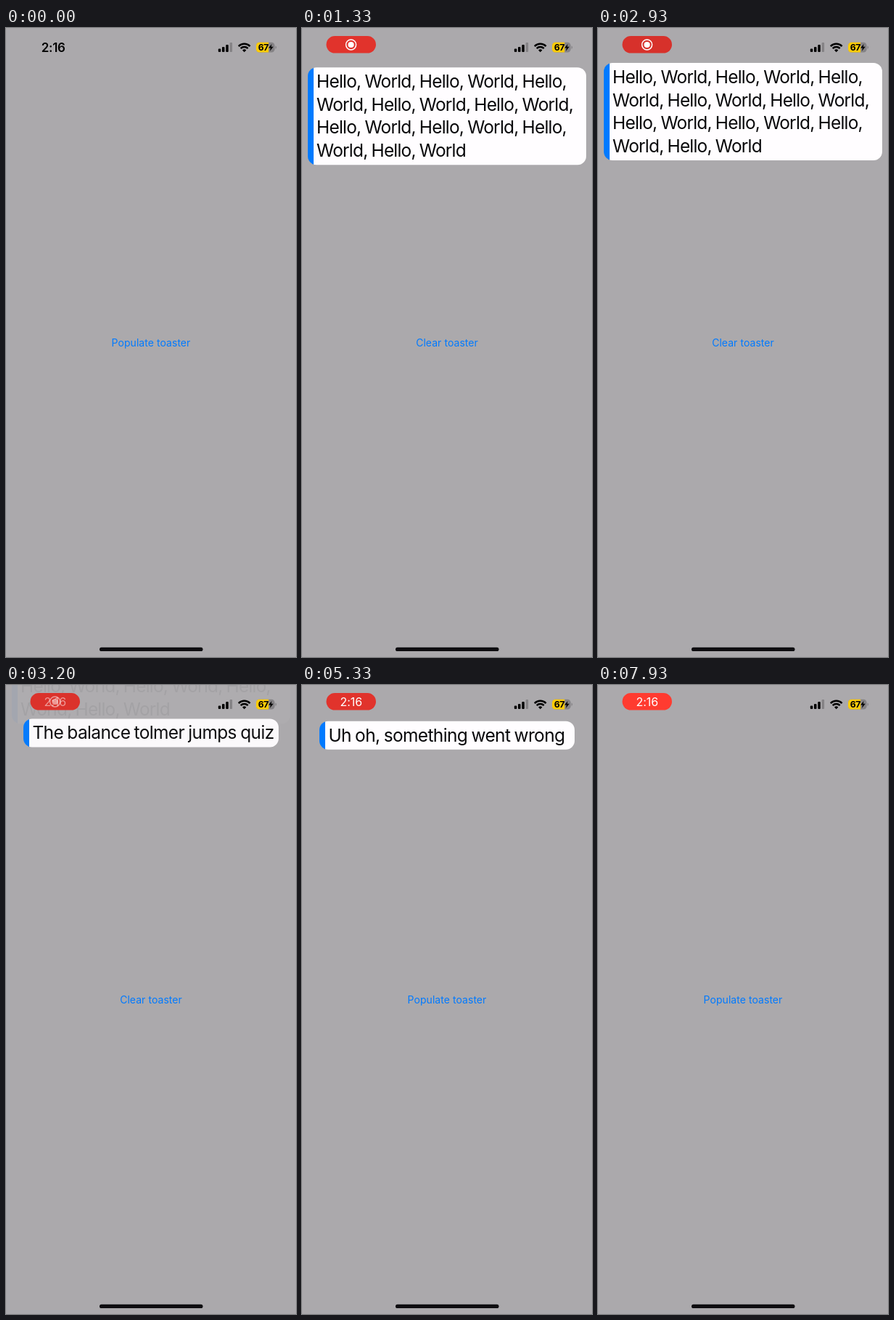
An HTML page for the animation above (8 s loop, 400x865 px).

```html
<!DOCTYPE html>
<html lang="en">
<head>
<meta charset="utf-8">
<title>Toaster</title>
<style>
  html, body { margin: 0; width: 100%; height: 100%; overflow: hidden; background: #aba9ac; }
  #stage {
    position: relative; width: 400px; height: 865px; overflow: hidden;
    background: #aba9ac; font-family: Inter, sans-serif; font-optical-sizing: none;
  }
  .toast {
    position: absolute; top: 48.2px; box-sizing: border-box;
    padding: 3.6px 0 3.5px 12.1px; border-radius: 12px; overflow: hidden;
    background: linear-gradient(90deg, #007aff 8.2px, #fffdff 8.2px);
    color: #08080a; font-size: 24.5px; line-height: 31.8px;
    letter-spacing: -.64px; word-spacing: -1px; white-space: pre; opacity: 0;
  }
  .wide { left: 8px; width: 384px; letter-spacing: -.81px; }
  .slim { left: 24.3px; width: 352.2px; }
  .label {
    position: absolute; left: 0; width: 400px; top: 423px; text-align: center;
    font-size: 14px; line-height: 20px; letter-spacing: .05px; color: #007aff;
  }
  #status { position: absolute; inset: 0; }
</style>
</head>
<body>
<div id="stage">
  <div class="label" id="populate">Populate toaster</div>
  <div class="label" id="clear">Clear toaster</div>

  <div class="toast wide">Hello, World, Hello, World, Hello,
World, Hello, World, Hello, World,
Hello, World, Hello, World, Hello,
World, Hello, World</div>
  <div class="toast slim">The balance tolmer jumps quiz</div>
  <div class="toast slim">Uh oh, something went wrong</div>

  <svg id="status" width="400" height="865" viewBox="0 0 400 865" text-anchor="middle">
    <text id="clock" x="65.2" y="33" font-size="17" font-weight="600" letter-spacing="-.3">2:16</text>

    <g id="pill">
      <rect id="pillFill" x="33.5" y="11" width="68.5" height="23.6" rx="11.8" fill="#ff3b30"/>
      <g id="record" fill="#fff">
        <circle cx="67.6" cy="23" r="7" fill="none" stroke="#fff" stroke-width="1.5"/>
        <circle cx="67.6" cy="23" r="4.1"/>
      </g>
      <text id="pillTime" x="67.8" y="28.7" font-size="16" letter-spacing="-.1" fill="#fff">2:16</text>
    </g>

    <!-- signal -->
    <rect x="292.8" y="28.4" width="3.5" height="4.6" rx="1"/>
    <rect x="298" y="26" width="3.5" height="7" rx="1"/>
    <rect x="303.3" y="23" width="3.5" height="10" rx="1"/>
    <rect x="308.6" y="20" width="3.5" height="13" rx="1" fill="#858386"/>

    <!-- wifi -->
    <g fill="none" stroke="#000" stroke-width="2.5">
      <path d="M320.8 25.1a11.2 11.2 0 0 1 15.8 0"/>
      <path d="M323.7 28.2a7 7 0 0 1 10 0"/>
    </g>
    <path d="M328.7 33.3l-2.7-2.8a3.9 3.9 0 0 1 5.4 0z"/>

    <!-- battery -->
    <clipPath id="charge"><rect x="345" y="19" width="17.2" height="16"/></clipPath>
    <rect x="345" y="19.8" width="25.6" height="13.8" rx="4.4" fill="#858386"/>
    <rect x="345" y="19.8" width="25.6" height="13.8" rx="4.4" fill="#ffcc0a" clip-path="url(#charge)"/>
    <path d="M371.6 24.6a2.4 2.4 0 0 1 0 4.4z" fill="#858386"/>
    <text x="354.8" y="31.2" font-size="12.3" font-weight="700" letter-spacing="-.5">67</text>
    <path d="M366.6 22l-4.6 5.6h2.9l-1 4.2 4.9-6h-3z"/>

    <rect x="129" y="851.8" width="142.5" height="5.2" rx="2.6" fill="#0e0d10"/>
  </svg>
</div>

<script>
  const LOOP = 8000;
  const FIRST = 980, STAY = 1985;
  const get = id => document.getElementById(id);
  const clamp = v => Math.min(1, Math.max(0, v));
  const ramp = (t, from, to) => clamp((t - from) / (to - from));
  const fade = (el, v) => { el.style.opacity = clamp(v); };

  // Under-damped spring from 0 to 1: 0.5 s response, 0.7 damping.
  function spring(ms) {
    if (ms <= 0) return 0;
    const damp = 0.7, s = ms / 1000, omega = 2 * Math.PI / 0.5;
    const root = Math.sqrt(1 - damp * damp), a = omega * root * s;
    return 1 - Math.exp(-damp * omega * s) * (Math.cos(a) + damp / root * Math.sin(a));
  }

  const toasts = [...document.querySelectorAll('.toast')].map((el, i) => ({
    el, height: el.offsetHeight, start: FIRST + i * STAY
  }));
  const [populate, clear, clock, pill, pillFill, record, pillTime] =
    ['populate', 'clear', 'clock', 'pill', 'pillFill', 'record', 'pillTime'].map(get);

  function draw(t) {
    for (const { el, height, start } of toasts) {
      const enter = spring(t - start), leave = spring(t - start - STAY);
      el.style.transform = `translateY(${height * (enter - 1 - leave)}px)`;
      fade(el, clamp(enter) * (1 - clamp(leave)));
    }

    const filled = clamp(spring(t - FIRST)) * (1 - clamp(spring(t - FIRST - 2 * STAY)));
    const pressed = t >= 870 && t < FIRST + 200;
    fade(populate, (1 - filled) * (pressed ? 0.35 : 1));
    fade(clear, filled);

    const shown = ramp(t, 60, 340);
    fade(clock, 1 - shown);
    fade(pill, shown);
    const glow = (1 + Math.cos(Math.PI * t / 1000)) / 2;
    const mix = (low, high) => Math.round(low + (high - low) * glow);
    pillFill.setAttribute('fill', `rgb(${mix(215, 255)},${mix(49, 59)},${mix(43, 48)})`);

    const swap = ramp(t, 3000, 3400);
    fade(record, 1 - swap);
    fade(pillTime, swap);
  }

  function tick() {
    draw(performance.now() % LOOP);
    requestAnimationFrame(tick);
  }
  tick();
</script>
</body>
</html>
```
